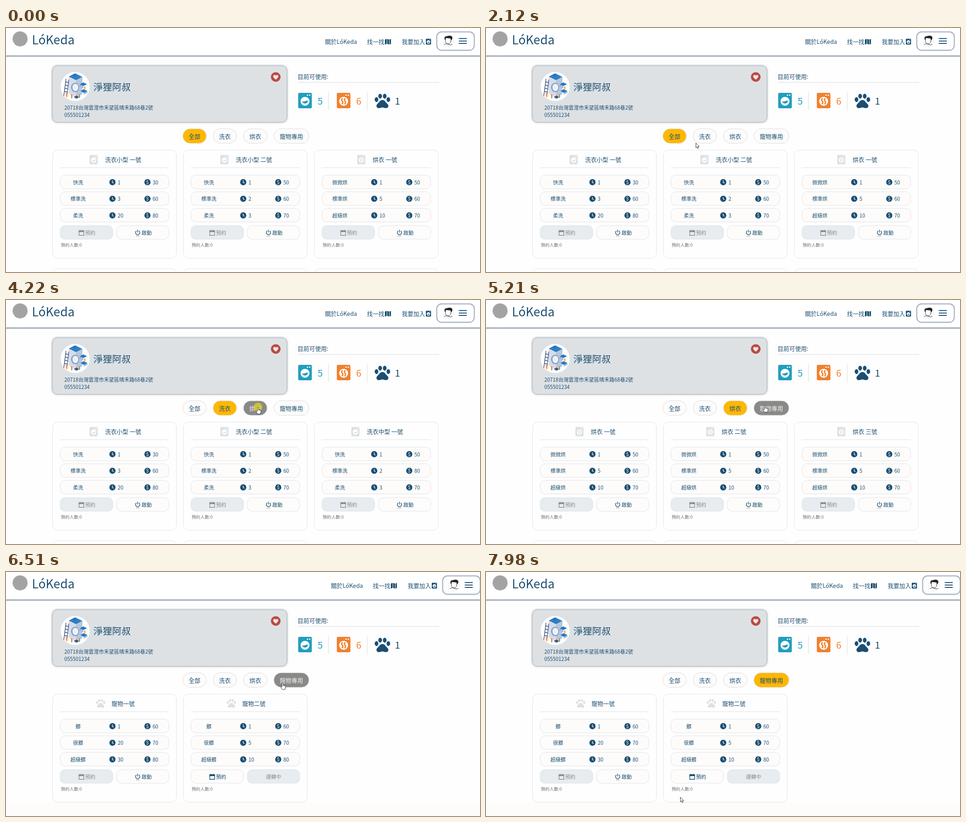
Write an HTML page that moves like this. It is 1042 px wide and 538 px high and loops after 8 s.

```html
<!DOCTYPE html>
<html lang="zh-Hant">
<head>
<meta charset="utf-8">
<title>LóKeda</title>
<style>
html, body { margin: 0; width: 100%; height: 100%; overflow: hidden; background: #fefefe; }
svg { display: block; width: 1042px; height: 538px; font-family: "Noto Sans CJK TC", "Noto Sans CJK", "Noto Sans CJK JP", sans-serif; }
.header { fill: #fff; filter: drop-shadow(0 1px 1.8px #1f3550); }
.shop { fill: #dde1e4; filter: drop-shadow(0 0 2.5px #5f6770); }
.user { fill: #fff; stroke: #8596ab; stroke-width: 1.2; filter: drop-shadow(0 0 1.5px #9aa9bb); }
.card { fill: #fefefe; stroke: #e0e4e9; }
.row { fill: #fdfcfb; stroke: #e0e3e7; }
.off { fill: #e6ecef; stroke: #dde2e6; }
.rule { stroke: #dcdfe3; stroke-width: 1.2; }
.tab rect { fill: currentColor; stroke: #d8dbdf; }
.anim { animation: 8s step-end infinite; }
</style>
</head>
<body>
<svg id="stage" viewBox="0 0 1042 538"></svg>
<script>
const NAVY = '#1b4f72', PALE = '#dde1e4', MUTE = '#8b8d8f';

// ---- basic shapes
const text = (x, cy, str, size = 12.8, attrs = '') =>
  `<text x="${x}" y="${cy + size * .38}" font-size="${size}" ${attrs}>${str}</text>`;
const mid = 'text-anchor="middle"';
const box = (x, y, w, h, r, cls) =>
  `<rect x="${x}" y="${y}" width="${w}" height="${h}" rx="${r}" class="${cls}"/>`;
const disc = (x, y, r, fill) => `<circle cx="${x}" cy="${y}" r="${r}" fill="${fill}"/>`;
const line = (x1, y1, x2, y2) => `<path class="rule" d="M${x1} ${y1}L${x2} ${y2}"/>`;
const put = (x, y, s, fill, inner) =>
  `<g transform="translate(${x} ${y}) scale(${s})" fill="${fill}">${inner}</g>`;

// ---- icons
const machine = (x, y, s, c, drum) => put(x, y, s, c,
  `<rect width="30" height="34" rx="3"/>` + disc(20.5, 5, 1.6, '#fff') + disc(25.5, 5, 1.6, '#fff') +
  disc(15, 18.5, 9.8, '#fff') + drum);
const icons = {
  wash: (x, y, s, c) => machine(x, y, s, c, '<path d="M8.6 18.5Q12 20.5 15 18.5T21.4 17.5A6.5 6.5 0 0 1 8.6 18.5Z"/>'),
  dry: (x, y, s, c) => machine(x, y, s, c,
    `<path d="M13 12Q9 15.5 12 18.5T11 25M19 12Q15 15.5 18 18.5T17 25" fill="none" stroke="${c}" stroke-width="2.8"/>`),
  pet: (x, y, s, c) => put(x, y, s, c,
    [[4, 13], [12, 5.5], [22, 5.5], [30, 13]].map(([a, b]) => `<ellipse cx="${a}" cy="${b}" rx="4" ry="5.2"/>`).join('') +
    '<path d="M17 14C12 14 10 19 6 22.5C2 26 4 32 9 32C12 32 14 30.5 17 30.5S22 32 25 32C30 32 32 26 28 22.5C24 19 22 14 17 14Z"/>')
};
const clock = (x, y) => disc(x, y, 6.8, NAVY) +
  `<path d="M${x} ${y - 3.8}v4.2l2.5 1.8" fill="none" stroke="#fff" stroke-width="1.3"/>`;
const coin = (x, y) => disc(x, y, 6.8, NAVY) + text(x, y - .2, '$', 10.5, mid + ' fill="#fff" font-weight="500"');
const calendar = (x, y, c) => `<path d="M${x + .7} ${y + 2}h10.6v10.3h-10.6zM${x + 3} ${y}v2M${x + 9} ${y}v2" fill="none" stroke="${c}" stroke-width="1.4"/>
  <path d="M${x} ${y + 1.5}h12v3.5h-12z" fill="${c}"/>`;
const power = (x, y) => `<path d="M${x - 2.8} ${y - 3.6}a4.7 4.7 0 1 0 5.6 0M${x} ${y - 6}v5.8" fill="none" stroke="${NAVY}" stroke-width="1.4"/>
  <path d="M${x - 3.5} ${y + 7.6}h7" stroke="${NAVY}" stroke-dasharray="1.6 1.1"/>`;

// ---- cards: kind, title, [program, minutes, price]..., busy
const COLS = [0, 287.5, 575.5];
function card([kind, title, rows, busy], col) {
  const w = [...title].reduce((sum, ch) => sum + (ch === ' ' ? 2.9 : 12.8), 34);
  const left = 240.5 - w / 2, ink = busy ? NAVY : MUTE;
  return `<g transform="translate(${COLS[col]})">` +
    box(102.5, 269.2, 272.3, 238.3, 11, 'card') +
    icons[kind](left, 280, .6, PALE) + text(left + 34, 290.5, title) + line(119, 308, 358, 308) +
    rows.map(([name, min, price], i) => {
      const y = 339.7 + i * 36.6;
      return box(119.2, y - 15.2, 239, 30, 10.5, 'row') + text(158.5, y + .6, name, 11.2, mid) +
        clock(234, y + .2) + text(245.5, y + .8, min, 11.2) + coin(311, y + .2) + text(322.3, y + .8, price, 11.2);
    }).join('') +
    box(119.2, 435.8, 115.6, 30, 10.5, busy ? 'row' : 'off') + calendar(159.8, 445, ink) +
    text(174, 452, '預約', 11.2, `fill="${ink}"`) +
    box(243.2, 435.8, 115, 30, 10.5, busy ? 'off' : 'row') +
    (busy ? text(300.7, 452, '運轉中', 11.2, mid + ` fill="${MUTE}"`) : power(289.5, 451) + text(298, 452, '啟動', 11.2)) +
    text(120.5, 478, '預約人數:0', 9.6, 'fill="#747678" font-weight="500"') + '</g>';
}
const rows = (names, mins, prices) => names.split(' ').map((n, i) => [n, mins[i], prices[i]]);
const WASH = '快洗 標準洗 柔洗', DRY = '微微烘 標準烘 超級烘', PET = '髒 很髒 超級髒';
const wash1 = ['wash', '洗衣小型 一號', rows(WASH, [1, 3, 20], [30, 60, 80])];
const wash2 = ['wash', '洗衣小型 二號', rows(WASH, [1, 2, 3], [50, 60, 70])];
const wash3 = ['wash', '洗衣中型 一號', rows(WASH, [1, 2, 3], [50, 80, 70])];
const dry = n => ['dry', `烘衣 ${n}號`, rows(DRY, [1, 5, 10], [50, 60, 70])];
const pet1 = ['pet', '寵物一號', rows(PET, [1, 20, 30], [60, 70, 80])];
const pet2 = ['pet', '寵物二號', rows(PET, [1, 5, 10], [60, 70, 80]), true];

const anim = (name, inner, cls = '') => `<g class="anim ${cls}" style="animation-name:${name}">${inner}</g>`;
const scene = (name, cards, below) => anim(name, cards.map(card).join('') +
  COLS.slice(0, below).map(x => box(102.5 + x, 530.8, 272.3, 238, 11, 'card')).join(''));

// ---- page parts
const avatar = disc(972, 28, 12.8, '#e3e6e9') + disc(972, 28, 12, '#fff') +
  `<path d="M966 23V29Q967 35 972 35T978 29V23M963 37Q967 33 972 36T981 36" fill="#fff" stroke="#333"/>
  <path d="M964 25Q963 18 969 18Q979 15 981 20Q982 24 979 27L977 23L967 22L966 26Z" fill="#222"/>`;
const nav = anim('nav',
  text(701.3, 29.8, '關於LóKeda') + text(793.5, 29.8, '找一找') +
  '<path d="M833 25.5l4-1.5v11l-4 1.5zM838 24l4 1.5v11l-4-1.5zM843 25.5l3.3-1.5v11l-3.3 1.5z"/>' +
  text(870, 29.8, '我要加入') + icons.wash(923, 23.7, .38, NAVY) +
  box(947.3, 8.8, 81.8, 40, 10, 'user') + avatar +
  `<path d="M995.5 23.3h17.5M995.5 28.7h17.5M995.5 34.1h17.5" stroke="${NAVY}" stroke-width="2"/>`);

const picture = disc(152, 129, 32, '#fff') +
  `<path d="M138 107l14-7 16 8v38l-14 7-16-8z" fill="#d5dcec"/><path d="M138 107l14-7 16 8-14 7z" fill="#2f7fc4"/>
  <path d="M154 115l14-7v38l-14 7z" fill="#b9c6df"/>
  <ellipse cx="152" cy="131" rx="9" ry="10.5" fill="#8aa0c4"/><ellipse cx="152.5" cy="131" rx="6.5" ry="8" fill="#eef2fa"/>
  <path d="M132 112l-5 38M138 114l-4 38M131 119l6 1M130 126l6 1M129 133l6 1M128 140l6 1" stroke="#31476e" stroke-width="1.3" fill="none"/>
  <path d="M162 124l8-4 8 4-8 4zM164 139l7-4 8 4-8 4zM144 104l7-3 6 3-7 3z" fill="#2478be"/>
  <path d="M162 125l8 4v4l-8-4zM171 143l8-4v4l-8 4z" fill="#9bb9df"/>
  <path d="M143 146h3v9h-3zM160 146h3v8h-3zM172 129h2.5v6h-2.5zM132 143h3v9h-3z" fill="#e6933f"/>
  <path d="M149 152l6-3 6 3-6 4z" fill="#2c5d9a"/>`;

const shop = box(102.5, 84, 514.5, 123, 10, 'shop') + picture +
  text(192.3, 130.5, '淨狸阿叔', 20.48) +
  text(128.2, 175.6, '20718台灣雲澄市禾望區晴禾路68巷2號', 11.2, 'font-weight="500"') +
  text(128.2, 191.7, '055501234', 11.2, 'font-weight="500"') +
  disc(593, 108, 10.6, '#bc4b41') +
  '<path d="M593 113.8C589 110.5 587.4 108.6 587.4 106.5C587.4 103 591.5 102.5 593 105.3C594.5 102.5 598.6 103 598.6 106.5C598.6 108.6 597 110.5 593 113.8Z" fill="#f2e9e9"/>';

const counts = text(641, 107.5, '目前可使用:') + line(641, 119.6, 952, 119.6) +
  icons.wash(642.3, 143, 1, '#219ebc') + text(685, 161, 5, 20.48, 'fill="#219ebc"') + line(709, 140, 709, 180) +
  icons.dry(727.2, 143, 1, '#f0812f') + text(769.8, 161, 6, 20.48, 'fill="#f0812f"') + line(794, 140, 794, 180) +
  icons.pet(810.5, 144.7, 1, NAVY) + text(855, 161, 1, 20.48);

const tab = (name, x, w, label) => anim(name, box(x, 222.2, w, 32, 16, '') + text(x + w / 2, 238.9, label, 12.8, mid), 'tab');
const tabs = tab('tabAll', 388.8, 51.6, '全部') + tab('tabWash', 455.3, 51.6, '洗衣') +
  tab('tabDry', 522, 52, '烘衣') + tab('tabPet', 588.8, 77.2, '寵物專用');

const pointer = anim('move',
  anim('click', disc(0, 0, 9.5, 'rgba(226,218,20,.72)')) +
  anim('arrow', '<path d="M.4 .6V11L2.8 8.8L4.5 12.8L6.2 12L4.5 8.2H7.7Z" fill="#fff" stroke="#222" stroke-width=".9"/>') +
  anim('hand', `<path d="M-1.5 1.2Q-1.4 0 -.2 0T1.1 1.2V5.4L5.4 6.4Q7 6.9 6.9 8.4L6.2 12L5.4 15.3H-.6L-4.1 10.4Q-4.8 8.6 -3.4 8.2L-1.5 9.8Z"
    fill="#fff" stroke="#222" stroke-width=".9"/><path d="M1.1 5.4V8M3.2 6V8.2M5.2 6.5V8.6" stroke="#222" stroke-width=".6"/>`));

document.getElementById('stage').innerHTML = `<g fill="${NAVY}">` +
  box(-10, -10, 1062, 70.8, 0, 'header') + disc(31, 24, 16.5, '#a3a3a5') +
  text(57, 26.2, 'LóKeda', 26.7) + nav + shop + counts + tabs +
  scene('all', [wash1, wash2, dry('一')], 3) +
  scene('wash', [wash1, wash2, wash3], 2) +
  scene('dry', ['一', '二', '三'].map(dry), 3) +
  anim('pet', '<path d="M0 508H1042V538H0Z" fill="#fdfcfa"/>') + scene('pet', [pet1, pet2], 0) +
  pointer + '</g>';

// ---- timing, all in ms of the 8 s loop
const frames = (name, list) =>
  `@keyframes ${name}{${list.map(([ms, css]) => `${ms / 80}%{${css}}`).join('')}}`;
const shown = (name, ...spans) => frames(name, [[0, 'visibility:hidden'],
  ...spans.flatMap(([a, b]) => [[a, 'visibility:visible'], [b, 'visibility:hidden']])]);
const look = {
  idle: `color:#fdfcfb;fill:${NAVY}`, hover: 'color:#898987;fill:#f4f4f4', on: `color:#ffb703;fill:${NAVY}`
};
const tabFrames = (name, ...list) => frames(name, list.map(([ms, s]) => [ms, look[s]]));

// [time, x, y, steps taken to the next point]
const path = [
  [0, 1060, 520], [260, 1037, 520], [330, 1033, 455], [400, 1060, 420],
  [600, 1036, 334, 6], [1020, 720, 249, 5], [1360, 610, 264, 6], [1780, 500, 269, 3], [1990, 451, 266, 2], [2120, 461, 253],
  [2190, 477, 244, 3], [2400, 480, 241], [3340, 480, 241, 6], [3760, 569, 240], [3890, 569, 240, 2], [4030, 554, 236],
  [5070, 554, 236, 3], [5280, 643, 230], [6160, 643, 230, 12], [7000, 559, 263, 8],
  [7560, 440, 420, 3], [7770, 391, 486], [7840, 404, 494, 2], [7980, 427, 496], [8000, 427, 496]
];
const style = document.createElement('style');
style.textContent = [
  frames('move', path.map(([ms, x, y, n = 1]) =>
    [ms, `transform:translate(${x}px,${y}px);animation-timing-function:steps(${n},end)`])),
  frames('nav', [[0, 'transform:none'], [5680, 'transform:translateX(13px)'], [8000, 'transform:translateX(13px)']]),
  shown('all', [0, 2930]), shown('wash', [2930, 4350]), shown('dry', [4350, 5680]), shown('pet', [5680, 8000]),
  shown('hand', [2190, 3480], [3550, 5140], [5210, 6720]),
  shown('arrow', [0, 2190], [3480, 3550], [5140, 5210], [6720, 8000]),
  shown('click', [2730, 2930], [4150, 4350], [5610, 5680]),
  tabFrames('tabAll', [0, 'on'], [2930, 'idle'], [8000, 'idle']),
  tabFrames('tabWash', [0, 'idle'], [2190, 'hover'], [3480, 'on'], [4350, 'idle'], [8000, 'idle']),
  tabFrames('tabDry', [0, 'idle'], [3550, 'hover'], [5140, 'on'], [5680, 'idle'], [8000, 'idle']),
  tabFrames('tabPet', [0, 'idle'], [5210, 'hover'], [6720, 'on'], [8000, 'on'])
].join('\n');
document.head.append(style);
</script>
</body>
</html>
```
